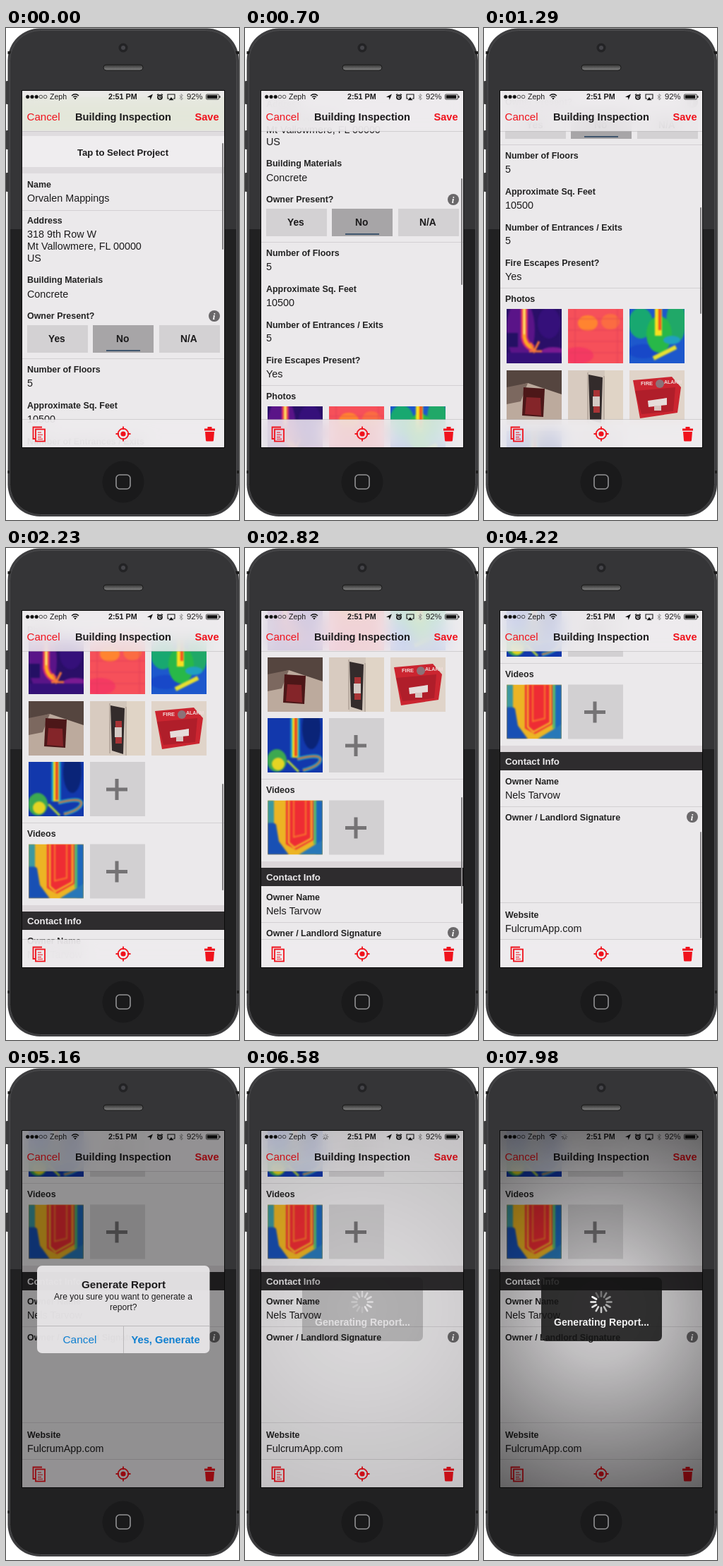
These frames come from a looping animation (330x697 px, 8 s). An HTML page:

```html
<!DOCTYPE html>
<html lang="en">
<head>
<meta charset="utf-8">
<style>
  html, body { margin: 0; width: 100%; height: 100%; overflow: hidden; background: #fff; }
  #stage { position: relative; width: 330px; height: 697px; overflow: hidden; }
  #stage > svg, #screen > * { position: absolute; left: 0; top: 0; }
  #screen { position: absolute; left: 23px; top: 89px; width: 286px; height: 505px; overflow: hidden; background: #ebe9eb; }
  svg { display: block; }
  text { font-family: "Liberation Sans", Arial, sans-serif; fill: #1c1b1c; white-space: pre; }
  .label { font-size: 12.45px; font-weight: bold; fill: #222; }
  .value { font-size: 14.35px; }
  .b { font-weight: bold; }
  .bar { width: 286px; background: rgba(238, 236, 238, .86); backdrop-filter: blur(11px) saturate(1.4); }
  #nav { height: 57px; box-shadow: 0 .5px 0 #b5b2b5; }
  #screen > #tools { top: 466px; height: 39px; box-shadow: 0 -.5px 0 #b5b2b5; }
  #dim, #vignette { width: 286px; height: 505px; }
  #dim { background: #000; }
  #vignette { background: radial-gradient(circle 290px at 143px 252px, rgba(0,0,0,.1), rgba(0,0,0,.18) 25%, rgba(0,0,0,.58)); }
</style>
</head>
<body>
<div id="stage">
  <svg width="330" height="697">
    <defs>
      <linearGradient id="speaker" x2="0" y2="1"><stop stop-color="#333"/><stop offset="1" stop-color="#858585"/></linearGradient>
      <clipPath id="bodyClip"><rect x="5" y="3" width="322" height="687" rx="43"/></clipPath>
    </defs>
    <g fill="#3b3b3c"><rect y="75" width="6" height="33" rx="1"/><rect y="145" width="6" height="27" rx="1"/><rect y="205" width="6" height="27" rx="1"/></g>
    <rect x="2.5" y=".5" width="327.5" height="691.5" rx="45.5" fill="#3e3e40"/>
    <path d="M2.5 35h5M325 35h5M2.5 629h5M325 629h5" stroke="#1c1c1c" stroke-width="4"/>
    <g clip-path="url(#bodyClip)">
      <rect width="330" height="285" fill="#353537"/>
      <rect y="285" width="330" height="412" fill="#212122"/>
    </g>
    <rect x="5.5" y="3.5" width="321" height="686" rx="43" fill="none" stroke="#4c4c4e"/>
    <circle cx="166" cy="28" r="6.5" fill="#232325"/><circle cx="166" cy="28" r="3" fill="#45454a"/>
    <rect x="138" y="52" width="56" height="8" rx="4" fill="url(#speaker)" stroke="#1a1a1a"/>
    <circle cx="166" cy="643" r="29.5" fill="#1a1a1b"/>
    <rect x="156" y="633" width="20" height="20" rx="5" fill="none" stroke="#929294" stroke-width="1.6"/>
    <rect x="22" y="88" width="288" height="507" fill="#0a0a0a"/>
  </svg>

  <div id="screen">
    <svg id="form" width="286" height="1310" viewBox="23 89 286 1310"></svg>
    <svg width="286" height="505" viewBox="23 89 286 505"><rect id="thumb" x="306" width="2" height="151" rx="1" fill="#858385"/></svg>
    <div id="nav" class="bar"></div>
    <div id="tools" class="bar"></div>
    <svg id="chrome" width="286" height="505" viewBox="23 89 286 505"></svg>
    <div id="dim"></div>
    <div id="vignette"></div>
    <svg width="286" height="505" viewBox="23 89 286 505">
      <g id="alert"></g>
      <g id="hud"></g>
    </svg>
  </div>
</div>

<script>
const $ = id => document.getElementById(id);
const text = (x, y, string, attrs = '') => `<text x="${x}" y="${y}" ${attrs}>${string}</text>`;
const label = (y, string) => text(30, y, string, 'class="label"');
const value = (y, string) => text(30, y, string, 'class="value"');
const bold = (x, y, size, string, fill = '#1c1b1c') =>
  text(x, y, string, `class="b" style="font-size:${size}px;fill:${fill}"`);
const plain = (x, y, size, string, fill = '#1c1b1c') =>
  text(x, y, string, `style="font-size:${size}px;fill:${fill}"`);
const rect = (x, y, w, h, fill, attrs = '') =>
  `<rect x="${x}" y="${y}" width="${w}" height="${h}" fill="${fill}" ${attrs}/>`;
const stroke = (d, color, width, attrs = '') =>
  `<path d="${d}" fill="none" stroke="${color}" stroke-width="${width}" ${attrs}/>`;
const shape = (d, fill) => `<path d="${d}" fill="${fill}"/>`;
const oval = (x, y, rx, ry, fill) => `<ellipse cx="${x}" cy="${y}" rx="${rx}" ry="${ry}" fill="${fill}"/>`;
const rule = y => rect(23, y, 286, 1, '#d3d0d3');
const info = y => `<circle cx="295" cy="${y}" r="8" fill="#6a686a"/>` +
  text(292.8, y + 4.5, 'i', 'style="font:italic bold 13px \'Liberation Serif\',serif;fill:#fff"');

const spokes = (x, y, inner, outer, count, color, width) =>
  Array.from({ length: count }, (_, i) =>
    `<path d="M${x} ${y - inner}V${y - outer}" stroke="${color}" stroke-width="${width}" stroke-linecap="round"
      opacity="${.25 + .75 * i / (count - 1)}" transform="rotate(${i * 360 / count} ${x} ${y})"/>`).join('');

// Photo tiles, each drawn in a 78 x 77 box
const tile = (x, y, background, art, blur = 1.2) =>
  `<svg x="${x}" y="${y}" width="78" height="77" viewBox="0 0 78 77">${rect(0, 0, 78, 77, background)}
   <g style="filter:blur(${blur}px)">${art}</g></svg>`;
const addTile = (x, y) => rect(x, y, 78, 77, '#d2d0d2') +
  stroke(`M${x + 23} ${y + 39}h30M${x + 38} ${y + 24}v30`, '#757375', 5);

const hotPipe = oval(20, 30, 20, 45, '#5a1488') + oval(60, 20, 16, 22, '#35107a') + oval(66, 62, 18, 8, '#7a1a92') +
  rect(0, 62, 78, 15, '#351078') + rect(0, 34, 16, 20, '#241064') +
  stroke('M25 -4V40Q27 52 38 56', '#d82a70', 10) + stroke('M25 -4V40Q27 52 38 56', '#ffa820', 5) +
  stroke('M25 -4V36', '#fff08a', 2) + stroke('M34 48L39 60L46 46M32 60H50', '#f87838', 3);
const hotWall = oval(28, 20, 14, 11, '#ff8430') + oval(60, 18, 13, 11, '#fb6c42') + oval(14, 66, 22, 12, '#f43a62') +
  stroke('M0 14H78M0 30H78M0 46H78M0 62H78M10 0V77M70 0V77', '#d83a58', 1, 'opacity=".6"');
const hotBeam = oval(16, 20, 17, 22, '#18a870') + oval(66, 18, 14, 30, '#20a868') + oval(20, 60, 22, 10, '#1848c8') +
  oval(42, 36, 18, 26, '#28b848') + stroke('M41 -3V38', '#f8e020', 10) + stroke('M43 -3V30', '#f05020', 4) +
  stroke('M34 70L66 54', '#e8e030', 6) + oval(60, 44, 12, 6, '#20a0c0');
const pullStation = shape('M0 0H78V34L30 18L0 26Z', '#55453f') + shape('M0 24L30 18L20 44L0 48Z', '#7c685f') +
  shape('M24 24L54 26L52 66L22 64Z', '#4c1718') + shape('M28 38L48 39L49 64L26 62Z', '#842529');
const extinguisher = shape('M0 0H28V77H0Z', '#d8cbc0') + shape('M52 0H78V77H50Z', '#e0d4c6') +
  shape('M29 6L49 10L47 75L31 70Z', '#332b2b') + rect(36, 28, 9, 32, '#a83436') + rect(35, 37, 10, 14, '#d4c9c4') +
  stroke('M28 3V74M51 8V77', '#b0a398', 1.5);
const fireAlarm = shape('M5 14L60 9L73 24L68 60L15 68Z', '#cb2530') + shape('M8 29L65 24L62 58L17 62Z', '#b01e2a') +
  shape('M26 43L53 39V49L27 52Z', '#e6dcda') + oval(43, 19, 6, 6, '#8c7278') + rect(35, 50, 10, 7, '#d8c4c0');
const hotConduit = oval(62, 14, 13, 30, '#0a2478') + oval(13, 60, 14, 16, '#3ca850') + oval(15, 65, 9, 9, '#e4d424') +
  stroke('M39 -4V56', '#18a8d0', 13) + stroke('M39 -4V56', '#f0dc20', 8) + stroke('M40 -4V54', '#e83a20', 3.5) +
  stroke('M42 58Q73 50 75 58Q74 68 50 74', '#20b8c8', 5) + stroke('M42 58Q73 50 75 58Q74 68 50 74', '#ec5a28', 2) +
  stroke('M28 60L44 76', '#b8d838', 3);
const hotDoor = shape('M0 26L12 34L16 58L30 77H0Z', '#1850b4') + rect(0, 0, 9, 32, '#3c98a0') +
  shape('M26 0H65V56L40 70L26 62Z', '#ee2c34') + rect(68, 0, 10, 77, '#1c68bc') + rect(65, 0, 4, 62, '#58b86c') +
  stroke('M62 0V54L38 67L30 60V0', '#f4b428', 2.5) + stroke('M37 0V52L54 48V0', '#f8782c', 2) +
  shape('M44 77L78 56V77Z', '#2878b8');

const choice = (x, textX, name, selected) =>
  rect(x, 421, 86, 39, selected ? '#a7a5a7' : '#d3d1d3') + bold(textX, 445, 13.8, name) +
  (selected ? rect(x + 19, 456, 48, 2, '#40566e') : '');

$('form').innerHTML = [
  rect(23, 89, 286, 1310, '#ebe9eb'),
  rect(23, 98, 286, 47, '#acc67c'), rect(23, 145, 286, 8, '#dfdcdf'),
  rect(23, 153, 286, 44, '#efedef'), rect(23, 197, 286, 9, '#dedbde'),
  bold(101, 181, 13.15, 'Tap to Select Project'),
  label(226, 'Name'), value(246, 'Orvalen Mappings'), rule(258),
  label(277, 'Address'), value(297, '318 9th Row W'), value(314, 'Mt Vallowmere, FL 00000'), value(331, 'US'),
  label(361, 'Building Materials'), value(381.5, 'Concrete'),
  label(412, 'Owner Present?'), info(408),
  choice(30, 60, 'Yes'), choice(123, 156, 'No', true), choice(217, 247, 'N/A'), rule(468),
  label(488, 'Number of Floors'), value(508, '5'),
  label(538.5, 'Approximate Sq. Feet'), value(558.5, '10500'),
  label(589.5, 'Number of Entrances / Exits'), value(609, '5'),
  label(640, 'Fire Escapes Present?'), value(660, 'Yes'), rule(671),
  label(691, 'Photos'),
  tile(32, 701, '#2a0f68', hotPipe), tile(119, 701, '#f6505a', hotWall), tile(206, 701, '#1d58cc', hotBeam),
  tile(32, 788, '#bcaa9d', pullStation, .7), tile(119, 788, '#d2c6bb', extinguisher, .7), tile(206, 788, '#e0d4c9', fireAlarm, .5),
  bold(222, 808.5, 7.5, 'FIRE', '#f0dcda'), bold(255, 807, 7, 'ALARM', '#f0dcda'),
  tile(32, 874, '#1238ac', hotConduit, .8), addTile(119, 874), rule(960),
  label(980, 'Videos'), tile(32, 990.5, '#ecb424', hotDoor, .8), addTile(119, 990.5),
  rect(23, 1077, 286, 9, '#dcd7da'), rect(23, 1086, 286, 26, '#2e2c2e'), bold(30, 1104, 13.2, 'Contact Info', '#eceaec'),
  label(1132, 'Owner Name'), value(1151.5, 'Nels Tarvow'), rule(1163),
  label(1182.5, 'Owner / Landlord Signature'), info(1178), rule(1299),
  label(1321, 'Website'), value(1340.5, 'FulcrumApp.com'),
].join('');

const red = '#f0121c', ink = '#111';
const statusBar = [30.7, 37, 43.2, 49.4, 55.6].map((x, i) =>
    `<circle cx="${x}" cy="97.5" r="2.3" fill="${i < 3 ? ink : 'none'}" stroke="${ink}" stroke-width=".7"/>`).join('') +
  plain(62, 101.3, 10.6, 'Zeph') +
  stroke('M93 96Q98 91.5 103 96M95 98Q98 95.4 101 98', ink, 1.5) + shape('M96.3 99.6Q98 98 99.7 99.6L98 101.5Z', ink) +
  bold(145, 101.3, 10.8, '2:51 PM') +
  shape('M200 97.8L208 93.5L204.6 102L204 98.2Z', ink) +
  `<circle cx="218" cy="98" r="3" fill="none" stroke="${ink}" stroke-width="1.7"/>` +
  stroke('M214 95L216 93.5M222 95L220 93.5M218 96V98.3H219.5', ink, 1.2) +
  stroke('M231 100H229V94H239V100H237', ink, 1.1) + shape('M230.5 102.3L234 98L237.5 102.3Z', ink) +
  stroke('M245.5 95.5L250.5 100L248 102V93.5L250.5 95.5L245.5 100', '#8a888a', .9) +
  plain(256, 101.3, 11.3, '92%') +
  rect(283.5, 94, 18, 7, 'none', `rx="1.2" stroke="${ink}" stroke-width=".8"`) + rect(284.7, 95.2, 14.6, 4.6, ink) + rect(302.3, 96, 1.2, 3, ink);

$('chrome').innerHTML = statusBar +
  `<g id="activity">${spokes(114, 97.5, 1.8, 4, 8, '#555', 1)}</g>` +
  plain(29.5, 131.3, 15.1, 'Cancel', red) + bold(98, 131.3, 14.65, 'Building Inspection') + bold(267.5, 131.3, 14.6, 'Save', red) +
  stroke('M51 565.5H38.5V582H41', red, 1.8) + rect(42, 568.5, 13, 17, 'none', `stroke="${red}" stroke-width="1.8"`) +
  stroke('M45 573H50M45 576.3H52M45 579.5H50M45 582.2H52', red, 1.1) +
  `<circle cx="166" cy="575" r="7.3" fill="none" stroke="${red}" stroke-width="1.8"/><circle cx="166" cy="575" r="3.6" fill="${red}"/>` +
  stroke('M166 564.5V569M166 581V585.5M155.5 575H160M172 575H176.5', red, 1.8) +
  shape('M281 567.5H285.5V565H291.5V567.5H296V570.5H281ZM282 572H295L294 584Q294 585.5 292.5 585.5H284.5Q283 585.5 283 584Z', red);

const blue = '#0f7fd0';
$('alert').innerHTML = rect(44, 280, 244.5, 124, '#e6e4e6', 'rx="7" fill-opacity=".97"') +
  bold(107, 312, 15.2, 'Generate Report') +
  plain(68, 328.3, 12.16, 'Are you sure you want to generate a') + plain(147, 343, 12.16, 'report?') +
  stroke('M44 365.5H288.5M166.5 365.5V404', '#bbb9bb', 1) +
  plain(80.5, 390, 15.4, 'Cancel', blue) + bold(177.5, 390, 14.7, 'Yes, Generate', blue);

$('hud').innerHTML = rect(81, 296.5, 171, 90.5, '#151415', 'rx="7" fill-opacity=".85"') +
  `<g id="spinner">${spokes(166, 331.5, 8, 14.5, 12, '#fff', 2.6)}</g>` + bold(99, 365, 14.05, 'Generating Report...', '#f2f2f2');

const LOOP = 8000, STEP = 117.4;
const scrollKeys = [[0, 0], [1290, 303], [2230, 571], [3400, 696], [4150, 797]];
const ramp = (t, from, to) => Math.min(1, Math.max(0, (t - from) / (to - from)));

function scrollAt(t) {
  const i = scrollKeys.findIndex(([time]) => time > t);
  if (i < 0) return scrollKeys.at(-1)[1];
  const [[t0, s0], [t1, s1]] = [scrollKeys[i - 1], scrollKeys[i]];
  const p = ramp(t, t0, t1);
  const eased = i === scrollKeys.length - 1 ? 1 - (1 - p) ** 1.8 : p;
  return s0 + (s1 - s0) * eased;
}

function render(time) {
  const t = Math.floor((time % LOOP + 8) / STEP) * STEP;
  const scroll = Math.floor(scrollAt(t));
  $('form').style.transform = `translateY(${-scroll}px)`;
  $('thumb').setAttribute('y', Math.round(163 + scroll * .3));
  $('thumb').style.opacity = 1 - ramp(t, 4200, 4500);

  const shown = ramp(t, 4940, 5150);
  const scale = 1.15 - .15 * shown;
  $('alert').style.opacity = shown * (1 - ramp(t, 6230, 6480));
  $('alert').setAttribute('transform', `translate(166 342) scale(${scale}) translate(-166 -342)`);
  $('dim').style.opacity = .38 * shown * (1 - ramp(t, 6260, 6610));

  const loading = ramp(t, 6490, 6830);
  $('vignette').style.opacity = loading;
  $('hud').style.opacity = loading;
  $('activity').style.opacity = t > 6440 ? 1 : 0;
  const turn = Math.floor(t / 83.3);
  $('spinner').setAttribute('transform', `rotate(${turn * 30} 166 331.5)`);
  $('activity').setAttribute('transform', `rotate(${turn * 45} 114 97.5)`);
}

const start = performance.now();
function tick() {
  render(performance.now() - start);
  requestAnimationFrame(tick);
}
tick();
</script>
</body>
</html>
```
